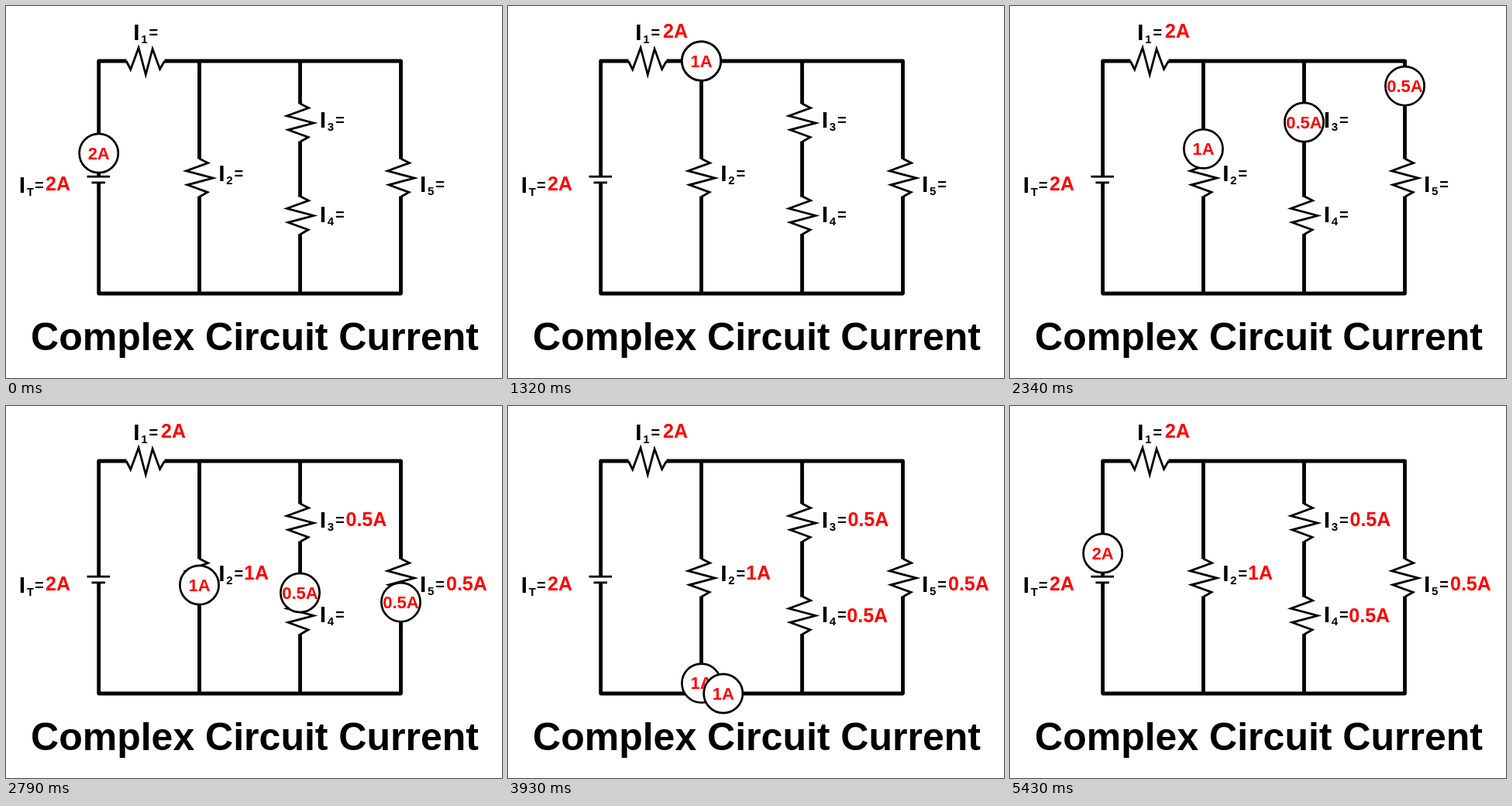
These frames come from a looping animation (640x480 px, 5460 ms). An HTML page:

```html
<!DOCTYPE html>
<html lang="en">
<head>
<meta charset="utf-8">
<title>Complex Circuit Current</title>
<style>
  html, body { margin: 0; width: 100%; height: 100%; overflow: hidden; background: #fff; }
  svg { display: block; width: 640px; height: 480px; }
  text { font-family: "Liberation Sans", Arial, Helvetica, sans-serif; font-weight: bold; }
  .wire { fill: none; stroke: #000; stroke-width: 4.8; stroke-linejoin: round; }
  .part { fill: none; stroke: #000; stroke-width: 2.8; }
  .sym { font-size: 30px; }
  .sub { font-size: 15px; }
  .eq { font-size: 20px; }
  .val { font-size: 25px; fill: #f00; }
  .title { font-size: 50px; text-anchor: middle; }
  .token circle { fill: #fff; stroke: #000; stroke-width: 2.7; }
  .token text { font-size: 22px; fill: #f00; text-anchor: middle; }
</style>
</head>
<body>
<svg id="stage" viewBox="0 0 640 480">
  <path class="wire" d="M155.5 71H119.7V219M119.7 228V371H509.5V245.5M204.5 71H509.5V197.5"/>
  <path class="wire" d="M249.5 71V197.5M249.5 245.5V371M379.5 71V126.5M379.5 174.5V246.5M379.5 294V371"/>
  <path class="part" d="M104.5 220.2H134M110.5 227.8H128"/>
  <text class="title" x="321" y="443.7">Complex Circuit Current</text>
</svg>
<script>
const STEP = 30, COUNT = 182;
const LEFT = 119.7, MID = 249.5, INNER = 379.5, RIGHT = 509.5, TOP = 71, BOTTOM = 371;
const stage = document.getElementById('stage');

function add(parent, tag, attrs, text) {
  const el = document.createElementNS('http://www.w3.org/2000/svg', tag);
  for (const key in attrs) el.setAttribute(key, attrs[key]);
  if (text) el.textContent = text;
  return parent.appendChild(el);
}

// Zigzag as [distance along the wire, sideways offset]
const zigzag = [[0, 0], [5.5, 11], [15.8, -17], [25, 17.5], [33.8, -15.5], [43.3, 10.5], [49.3, 0]];
function resistor(x, y, across) {
  const pts = zigzag.map(([d, s]) => across ? [x + d, y + s] : [x + s, y + d]);
  add(stage, 'path', { class: 'part', d: 'M' + pts.join('L') });
}
resistor(155.3, TOP, true);
resistor(MID, 197);
resistor(INNER, 126);
resistor(INNER, 245.5);
resistor(RIGHT, 197);

// Readings: subscript, value, position, value position, step at which the value appears
const readings = [
  ['T', '2A', 16.8, 240.5, 51, 238, 0],
  ['1', '2A', 164.2, 43.5, 200, 41.2, 35],
  ['2', '1A', 274.2, 226.3, 307, 224.2, 90],
  ['3', '0.5A', 404.8, 157.3, 438.5, 154.8, 79],
  ['4', '0.5A', 404.8, 279.3, 437.3, 278.5, 98],
  ['5', '0.5A', 534, 240.3, 568, 238.2, 90]
].map(([sub, value, x, y, vx, vy, from]) => {
  add(stage, 'text', { class: 'sym', x, y }, 'I');
  add(stage, 'text', { class: 'sub', x: x + 10, y: y + 4 }, sub);
  add(stage, 'text', { class: 'eq', x: x + 20.2, y: y - 3 }, '=');
  return { from, el: add(stage, 'text', { class: 'val', x: vx, y: vy }, value) };
});

// Each token: label, then [step, x, y] stops; it is gone at the last one unless kept
const tokens = [
  ['2A', [0, LEFT, 190], [26, LEFT, TOP], [44, MID, TOP]],
  ['1A', [44, MID, TOP], [89, MID, 221], [90, MID, 221], [135, MID, BOTTOM], [136, MID, BOTTOM]],
  ['1A', [44, MID, TOP], [66, INNER, TOP]],
  ['0.5A', [66, INNER, TOP], [78, INNER, 150], [79, INNER, 150], [113, INNER, BOTTOM]],
  ['0.5A', [66, INNER, TOP], [75, RIGHT, TOP], [89, RIGHT, 221], [90, RIGHT, 221],
    [104, RIGHT, BOTTOM], [113, INNER, BOTTOM]],
  ['1A', [113, INNER, BOTTOM], [136, MID, BOTTOM]],
  ['2A', [136, MID, BOTTOM], [157, LEFT, BOTTOM], [181, LEFT, 190], [182, LEFT, 190]]
].map(([label, ...stops]) => {
  const el = add(stage, 'g', { class: 'token' });
  add(el, 'circle', { r: 25.1 });
  add(el, 'text', { y: 7.6 }, label);
  return { el, stops };
});

function place(stops, step) {
  const i = stops.findIndex(stop => stop[0] > step);
  if (i < 1) return null;
  const [s0, x0, y0] = stops[i - 1], [s1, x1, y1] = stops[i];
  const k = (step - s0) / (s1 - s0);
  return [x0 + (x1 - x0) * k, y0 + (y1 - y0) * k];
}

function show(el, on) {
  el.setAttribute('visibility', on ? 'visible' : 'hidden');
}

function draw() {
  const step = Math.floor((performance.now() + 0.01) / STEP) % COUNT;
  for (const { el, from } of readings) show(el, step >= from);
  for (const { el, stops } of tokens) {
    const at = place(stops, step);
    show(el, at);
    if (at) el.setAttribute('transform', `translate(${at})`);
  }
  requestAnimationFrame(draw);
}
draw();
</script>
</body>
</html>
```
